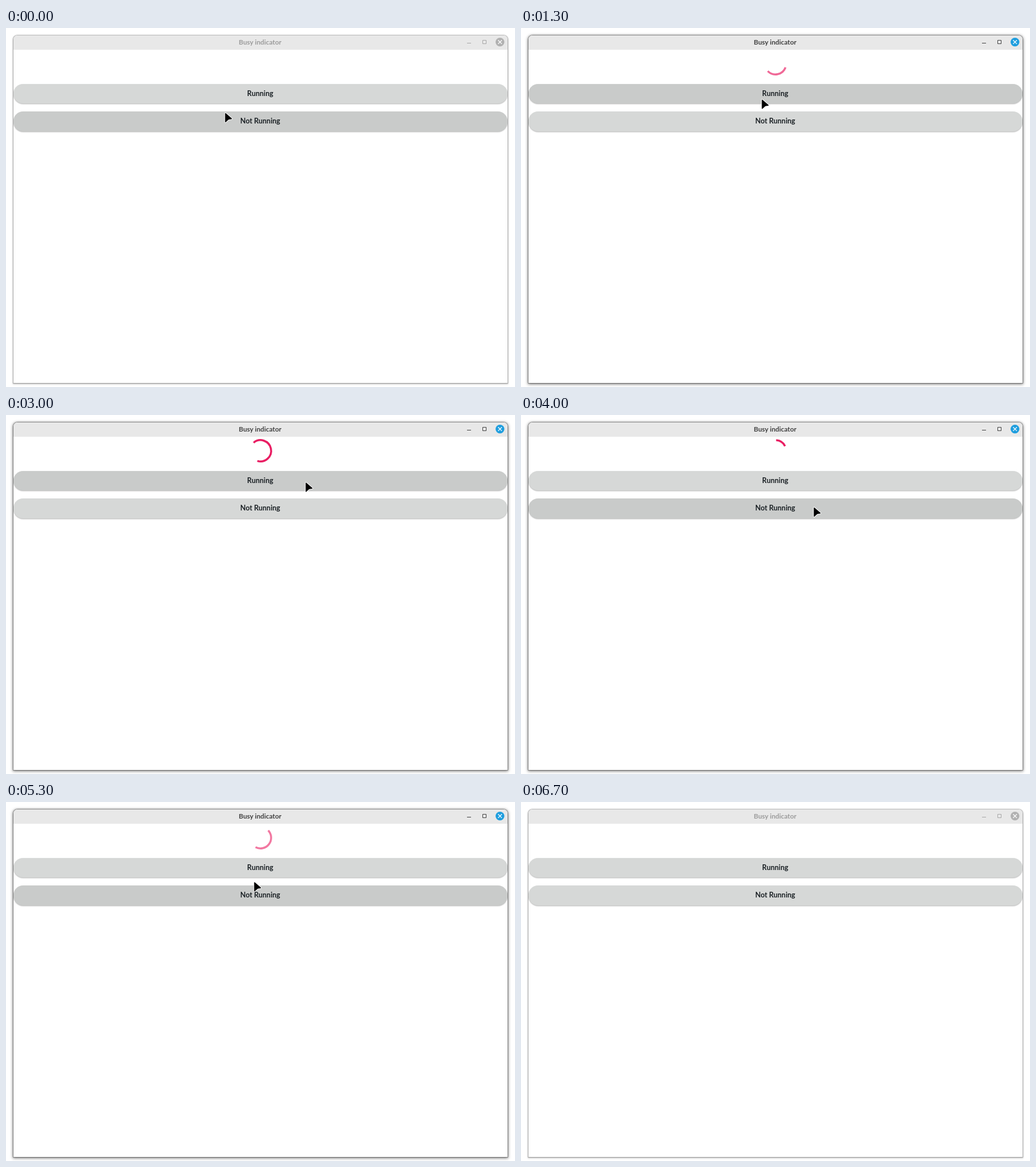
Animation, 891 px wide and 628 px high, one loop 6900 ms. Source, as an HTML page:

```html
<!DOCTYPE html>
<html lang="en">
<head>
<meta charset="utf-8">
<title>Busy indicator</title>
<style>
  html, body { margin: 0; width: 100%; height: 100%; overflow: hidden; background: #fff; }
  #stage { position: absolute; left: 0; top: 0; width: 891px; height: 628px; overflow: hidden; }
  #win {
    position: absolute; left: 13px; top: 13px; width: 865px; height: 608px;
    border-radius: 7px 7px 0 0; background: #fff;
    box-shadow: 0 0 0 1px rgba(0,0,0,.2), 0 1px 3px 1px rgba(0,0,0,.27);
  }
  .active #win { box-shadow: 0 0 0 1px rgba(0,0,0,.3), 0 1px 5px 1px rgba(0,0,0,.55); }
  #view { position: absolute; inset: 0; overflow: hidden; border-radius: inherit; }
  #bar { height: 24.5px; background: #e8e8e8; }
  .btn { position: absolute; left: 0; width: 865px; height: 34.5px; border-radius: 17.25px; }
  #run { top: 84.5px; }
  #stop { top: 133px; }
  svg { position: absolute; left: 0; top: 0; }
  text { font: 700 12.5px Lato, "Open Sans", sans-serif; text-anchor: middle; fill: #1b2125; }
  #title { font-size: 11.8px; fill: #9b9b9b; }
  .active #title { fill: #404040; }
  #icons { fill: none; stroke: #a6a6a6; }
  .active #icons { stroke: #3f3f3f; }
  #close { fill: #b1b1b1; }
  .active #close { fill: #1f9ede; }
</style>
</head>
<body>
<div id="stage">
  <div id="win">
    <div id="view">
      <div id="bar"></div>
      <div id="run" class="btn"></div>
      <div id="stop" class="btn"></div>
    </div>
  </div>
  <svg width="891" height="628" viewBox="0 0 891 628">
    <text id="title" x="444.8" y="29">Busy indicator</text>
    <g id="icons"><path d="M807 26.5h7M834.5 21.5h6v6h-6z"/></g>
    <circle id="close" cx="864.7" cy="24.6" r="7.7"/>
    <path d="M861.4 21.3l6.6 6.6m0-6.6l-6.6 6.6" stroke="#fff" stroke-width="1.3" fill="none"/>
    <text x="445" y="119">Running</text>
    <text x="445" y="167">Not Running</text>
    <path id="arc" fill="none" stroke="#e91e63" stroke-width="3.5"/>
    <path id="cursor" d="M0 .8V15.8Q.2 17 1.2 16.2L5.6 12.2Q6.3 11.5 7.3 11.4L11.4 10.9Q12.6 10.4 11.7 9.5L1.2 .4Q.2 0 0 .8Z"
          fill="#000" stroke="#fff" stroke-width="2" stroke-linejoin="round" paint-order="stroke"/>
  </svg>
</div>
<script>
  const LOOP = 6900;
  const $ = id => document.getElementById(id);
  const clamp = v => Math.max(0, Math.min(1, v));

  // Pointer moves: start ms, end ms, goal x, goal y. It rests in between.
  const moves = [
    [300, 700, 426.5, 125],
    [1100, 1300, 421.5, 125],
    [2400, 3000, 524.5, 118],
    [3100, 3600, 512.5, 161.5],
    [4000, 4300, 511.5, 164.5],
    [5100, 5900, 203, 66.5],
    [5900, 6400, -20, -30]
  ];

  function pointer(ms) {
    let x = 383.5, y = 148.5;
    for (const [from, to, gx, gy] of moves) {
      const p = clamp((ms - from) / (to - from));
      x += (gx - x) * p;
      y += (gy - y) * p;
    }
    return [x, y];
  }

  // Rises to 1 after "on" and falls back to 0 after "off".
  const pulse = (ms, on, off, rise = 150, fall = 400) =>
    clamp(Math.min((ms - on) / rise, 1 - (ms - off) / fall));

  function paintButton(id, hover, lift) {
    const el = $(id), c = [214, 216, 215].map(v => Math.round(v - 13 * hover));
    el.style.background = `rgb(${c})`;
    el.style.boxShadow = `0 ${1 + 3 * lift}px ${2 + 5 * lift}px rgba(0,0,0,${.3 + .05 * lift})`;
  }

  // Arc grows from 10 to 300 degrees, then its tail catches up, while the whole ring turns.
  function arcPath(t) {
    const span = 700, r = 18.6;
    const p = t % span / span;
    const base = Math.floor(t / (2 * span)) * 290 + t * 720 / 4200 - 5;
    const growing = t % (2 * span) < span;
    const from = growing ? base : base + 290 * p * p;
    const to = growing ? base + 10 + 290 * p * (2 - p) : base + 300;
    const point = deg => {
      const a = deg * Math.PI / 180;
      return `${445.5 + r * Math.cos(a)} ${62.6 + r * Math.sin(a)}`;
    };
    return `M${point(from)}A${r} ${r} 0 ${to - from > 180 ? 1 : 0} 1 ${point(to)}`;
  }

  function draw(time) {
    // The screen updates ten times a second, with one longer hold.
    let ms = Math.floor(time % LOOP / 100) * 100;
    if (ms === 3100) ms = 3000;

    $('stage').classList.toggle('active', ms >= 700 && ms < 6700);
    paintButton('run',
      Math.max(pulse(ms, 450, 3200), pulse(ms, 5550, 5900)),
      pulse(ms, 650, 800, 150, 150));
    paintButton('stop',
      Math.max(pulse(ms, -LOOP, 450), pulse(ms, 3250, 5700)),
      pulse(ms, 4900, 5050, 150, 150));

    $('cursor').setAttribute('transform', `translate(${pointer(ms)})`);
    $('arc').setAttribute('d', arcPath(Math.max(0, .96 * (ms - 1150))));
    $('arc').setAttribute('opacity', pulse(ms, 1100, 5200, 300, 250));
  }

  const start = performance.now();
  function tick() {
    draw(performance.now() - start);
    requestAnimationFrame(tick);
  }
  tick();
</script>
</body>
</html>
```
